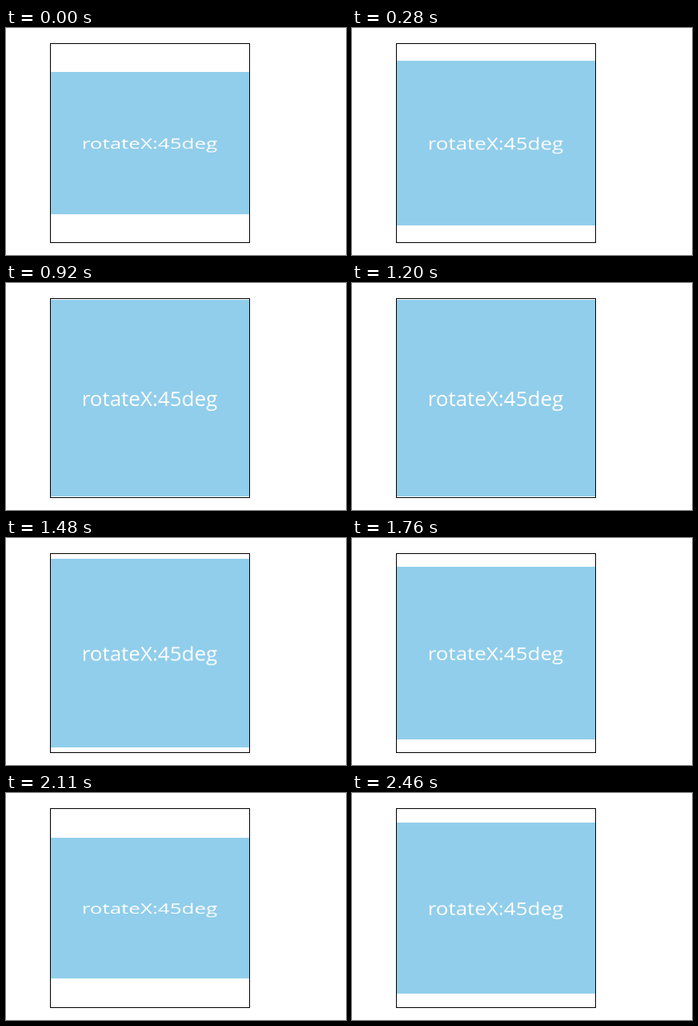
Recreate the animation shown at these times as an HTML page. Size 425 by 284 pixels, loop 2530 ms.

```html
<!DOCTYPE html>
<html lang="en">
<head>
<meta charset="utf-8">
<title>rotateX</title>
<style>
  html, body { margin: 0; width: 100%; height: 100%; overflow: hidden; background: #fff; }
  .frame {
    position: absolute; left: 55px; top: 19px;
    width: 248px; height: 248px; border: 1px solid #000;
  }
  .panel {
    height: 248px; background: #91ceeb; color: #fff;
    font: 26px/248px "Open Sans", "Noto Sans", sans-serif;
    text-align: center; white-space: nowrap; text-indent: -1px;
  }
</style>
</head>
<body>
<div class="frame"><div class="panel">rotateX:45deg</div></div>
<script>
  const LOOP = 2530, STEP = 70, SWING = 1050, FLAT_AT = 1069, MAX_ANGLE = 45;
  const LONG_STEP_END = 920;
  const panel = document.querySelector('.panel');

  // The picture advances in 70 ms steps; the one before 920 ms lasts 80 ms.
  function stepTime(t) {
    if (t >= LONG_STEP_END) return LONG_STEP_END + Math.floor((t - LONG_STEP_END) / STEP) * STEP;
    return Math.min(Math.floor(t / STEP) * STEP, 840);
  }

  // Linear swing between flat and 45 degrees.
  function angleAt(t) {
    const phase = Math.abs(t - FLAT_AT) / SWING;
    return MAX_ANGLE * (1 - Math.abs(1 - phase));
  }

  function draw() {
    const t = stepTime(performance.now() % LOOP);
    panel.style.transform = `rotateX(${angleAt(t)}deg)`;
    requestAnimationFrame(draw);
  }
  draw();
</script>
</body>
</html>
```
